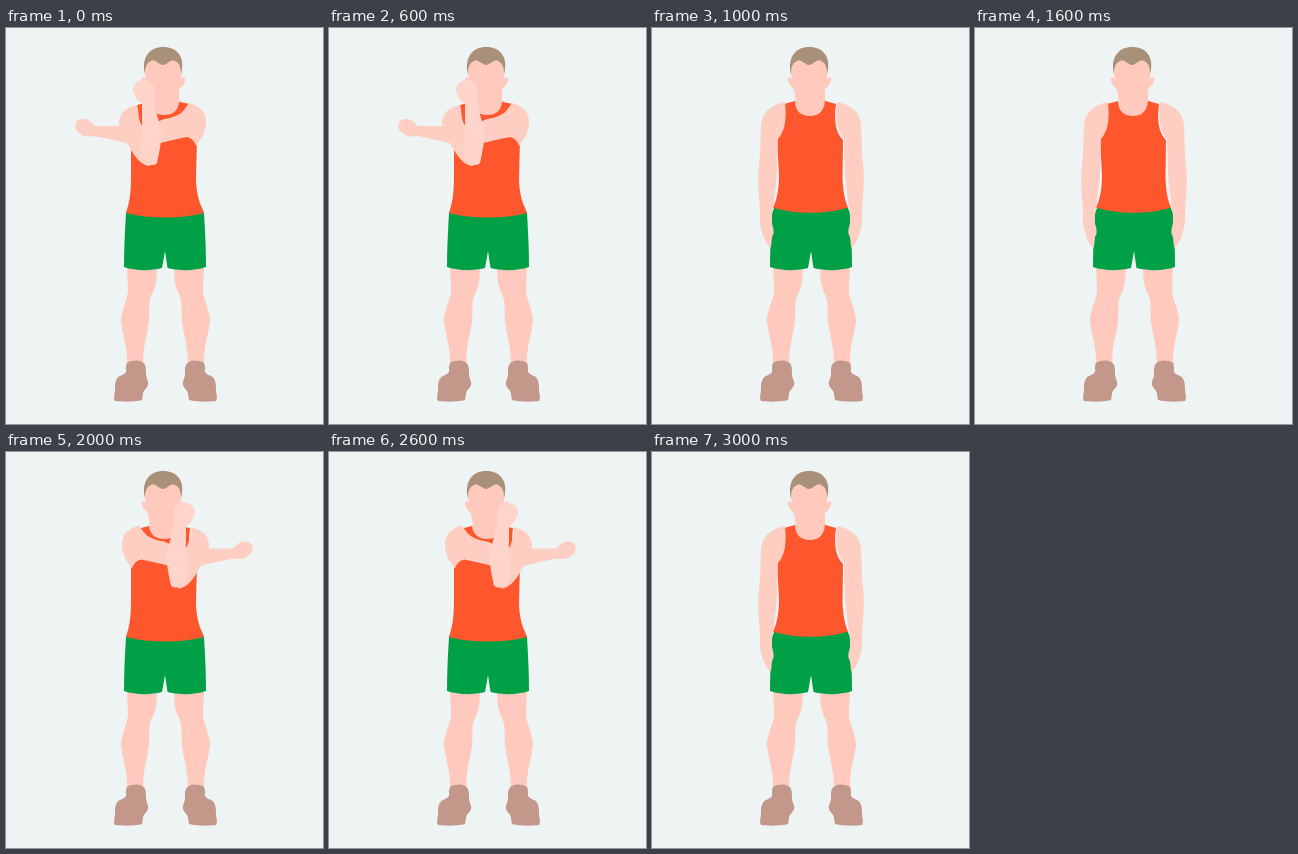
An HTML page that plays this animation: 317 by 396 pixels, repeating every 4 s.

```html
<!DOCTYPE html>
<html lang="en">
<head>
<meta charset="utf-8">
<title>Shoulder stretch</title>
<style>
  html, body { margin: 0; height: 100%; overflow: hidden; background: #eef3f4; }
  svg { display: block; width: 100vw; height: 100vh; }
  .skin { fill: #ffc9bd; }
  .arm { fill: #ffcec3; }
  .light { fill: #ffd5cb; }
  .shirt { fill: #ff572d; }
  .shorts { fill: #00a046; }
  .shoe { fill: #c4978b; }
  .hair { fill: #a99079; }
</style>
</head>
<body>
<svg viewBox="0 0 317 396">
  <defs>
    <g id="leg">
      <path class="skin" d="M121 236L151 236C151 249 150 260 146 266C142 274 144 282 143 293C142 305 137 316 137 338L121 338C122 318 116 306 115 293C115 282 121 274 122 263Z"/>
      <path class="shoe" d="M121 335C126 332 132 332 136 334C140 336 140 340 140 346C140 351 143 353 142 357C141 361 137 362 137 366L136 372C128 374 117 374 109 373C107 370 109 366 109 361C109 354 110 350 114 348C119 346 121 344 120 341C120 339 120 337 121 335Z"/>
    </g>
    <path id="arm" class="arm" d="M133 74C119 77 110 84 109 97C108 113 109 122 107 136C105 154 107 168 108 181C107 194 109 204 113 212C115 217 118 220 119 219L120 209C122 206 122 203 121 199C119 193 120 187 121 180C123 164 125 154 125 140L126 111C132 104 135 94 133 74Z"/>
    <g id="cross">
      <path class="arm" d="M183 75C195 78 200 85 200 94C200 105 195 111 190 118C188 112 185 110 181 109C171 111 161 113 150 116L126 117C115 113 102 111 88 108C83 109 78 109 75 106C70 104 68 99 70 95C71 91 77 90 82 92C86 94 86 97 90 98L114 98L133 97C145 96 152 94 158 91C166 90 174 87 178 82Z"/>
      <path class="arm" d="M131 77C121 79 114 84 113 94C113 103 120 113 125 122C130 131 137 138 144 138L150 122L137 100C133 93 132 87 131 77Z"/>
      <path class="light" d="M136 71L148 71C149 83 153 92 155 102C156 113 153 126 151 135C148 139 139 137 135 128C132 115 138 105 136 93Z"/>
      <path class="light" d="M130 71C130 67 126 64 127 60C129 55 134 51 140 52C146 53 148 57 148 63L148 73L136 76Z"/>
    </g>
  </defs>

  <use href="#leg"/>
  <use href="#leg" transform="matrix(-1 0 0 1 319 0)"/>
  <path class="shorts" d="M123 178L195 178L198 185C199 202 200 220 200 239C188 243 174 243 161.5 240L159 223L156 240C144 243 130 243 118 239C118 220 119 202 120 185Z"/>

  <path class="skin" d="M139 33C138 42 139 46 140 51C137 48 135 50 136 53C137 57 140 58 142 62L144 73L135 77L145 92L172 92L181 77L173 72L173 62C175 58 178 57 179 53C180 50 178 48 175 51L176 33Z"/>
  <path class="hair" d="M139 46C135 29 144 19 157 19C171 19 180 29 175 46C175 40 174 35 169 33C164 31 161 37 157 37C153 37 150 31 145 33C140 35 139 40 139 46Z"/>

  <g id="rest">
    <path class="shirt" d="M132 76L143 73C143 83 149 88 158 88C167 88 172 83 173 73L184 76C182 91 183 104 191 112L190.5 150C191 164 193 173 196 179.5C174 186.500 143 186.500 121 179.500C125 171 127 161 127 147L125 111C133 104 134 90 132 76Z"/>
    <use href="#arm"/>
    <use href="#arm" transform="matrix(-1 0 0 1 318 0)"/>
  </g>
  <g id="stretch">
    <path class="shirt" d="M131 77L143 74C144 83 150 87 158 87C167 87 172 83 173 74L184 76C182 91 183 104 191 112L190 150C190 166 194 176 198 185C175 191 143 191 120 185C124 173 125 163 125 147L125 111C133 104 134 90 131 77Z"/>
    <use id="pair" href="#cross"/>
  </g>
</svg>
<script>
  const [rest, stretch, pair] = ['rest', 'stretch', 'pair'].map(id => document.getElementById(id));
  const sides = ['matrix(1 0 0 1 0 0)', 'matrix(-1 0 0 1 316 -1.5)'];

  // One pose per second: left stretch, rest, right stretch, rest.
  function draw() {
    const pose = Math.floor(performance.now() / 1000) % 4;
    const resting = pose % 2 === 1;
    rest.style.display = resting ? '' : 'none';
    stretch.style.display = resting ? 'none' : '';
    pair.setAttribute('transform', sides[pose >> 1]);
    requestAnimationFrame(draw);
  }
  draw();
</script>
</body>
</html>
```
